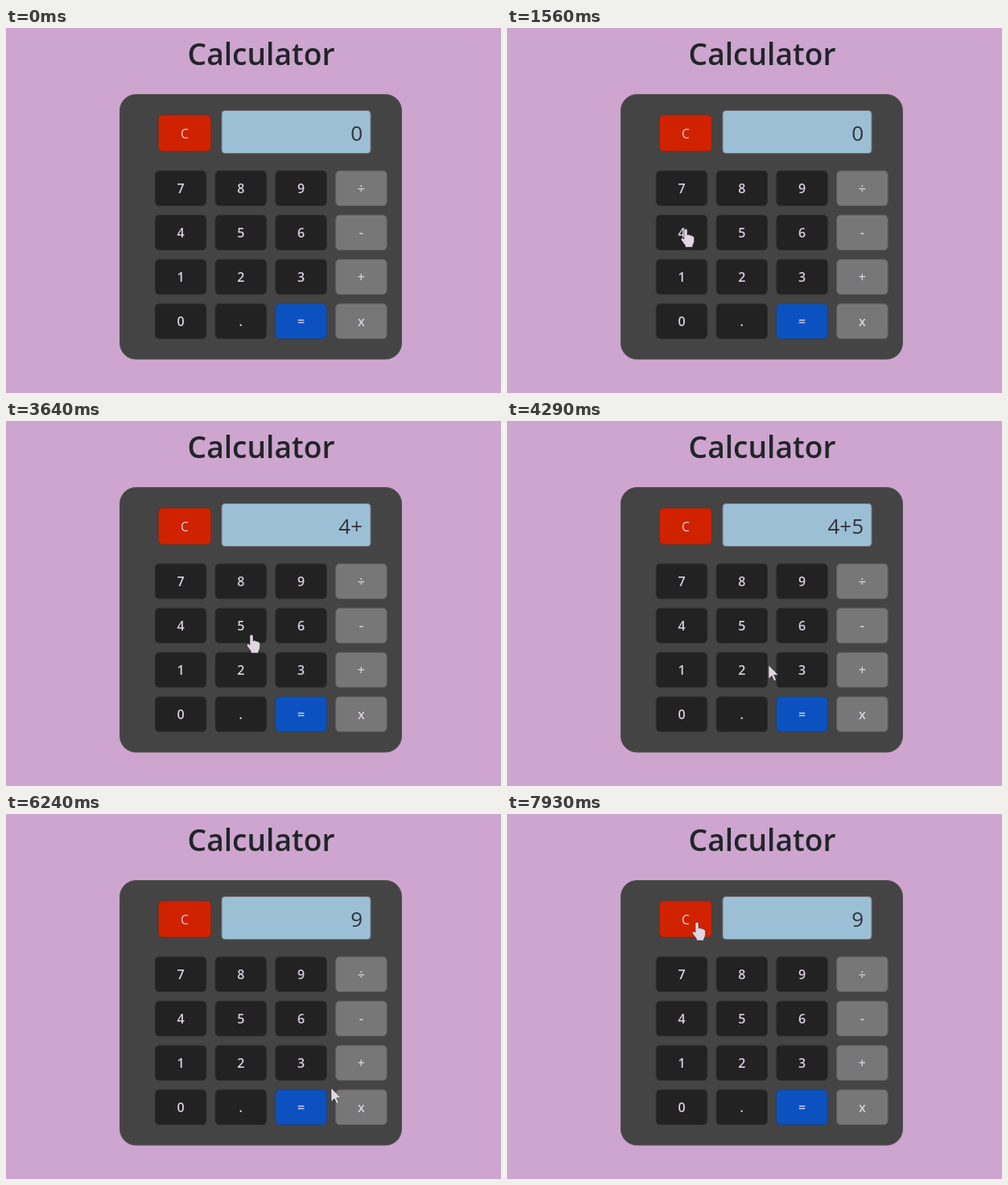
These frames come from a looping animation (615 by 453 pixels, 8 s). An HTML page with a canvas:

```html
<!DOCTYPE html>
<html lang="en">
<head>
<meta charset="utf-8">
<title>Calculator</title>
<style>
  html, body { margin: 0; width: 100%; height: 100%; overflow: hidden; background: #cda5cf; }
  canvas { display: block; }
</style>
</head>
<body>
<canvas id="stage" width="615" height="453"></canvas>
<script>
const ctx = document.getElementById('stage').getContext('2d');
const LOOP = 8000, STEP = 130;
const SANS = '"Open Sans", "Noto Sans", sans-serif';
const KEY = { fill: '#222222', edge: '#2e2e2e' };
const OPERATOR = { fill: '#777777', edge: '#626262' };
const EQUALS = { fill: '#0b52c0', edge: '#20437a' };
const CLEAR = { fill: '#d12200', edge: '#7d2a1c' };

const buttons = [{ label: 'C', x: 189, y: 107.5, w: 66, h: 46, style: CLEAR }];
['789÷', '456-', '123+', '0.=x'].forEach((row, r) => [...row].forEach((label, c) => {
  const style = label === '=' ? EQUALS : c === 3 ? OPERATOR : KEY;
  buttons.push({ label, x: 184.8 + c * 74.8, y: 176.7 + r * 55, w: 64.4, h: 44.4, style });
}));

// The pointer glides to each place, then a press may change the display.
const entry = { x: 487, y: 205 };
const visits = [
  { leave: 390, arrive: 1690, x: 219, y: 249, press: 2210, shows: '4' },
  { leave: 2340, arrive: 3120, x: 441, y: 308, press: 3120, shows: '4+' },
  { leave: 3250, arrive: 3900, x: 279, y: 257, press: 4160, shows: '4+5' },
  { leave: 4030, arrive: 5200, x: 396, y: 373, press: 5460, shows: '9' },
  { leave: 6110, arrive: 7020, x: 427, y: 249 },
  { leave: 7020, arrive: 7930, x: 236, y: 134 }
];

const easeOut = k => 1 - (1 - k) ** 2;
const mix = (a, b, k) => a + (b - a) * k;

function pointerAt(time) {
  const index = visits.findLastIndex(visit => time >= visit.leave);
  if (index < 0) return null;
  const to = visits[index], from = visits[index - 1] || entry;
  const k = easeOut(Math.min(1, (time - to.leave) / (to.arrive - to.leave)));
  return { x: mix(from.x, to.x, k), y: mix(from.y, to.y, k) };
}

function readingAt(time) {
  const last = visits.findLast(visit => time >= visit.press);
  return last ? last.shows : '0';
}

function box(x, y, w, h, radius, { fill, edge }) {
  ctx.beginPath();
  ctx.roundRect(x + 0.5, y + 0.5, w - 1, h - 1, radius);
  ctx.fillStyle = fill;
  ctx.fill();
  ctx.strokeStyle = edge;
  ctx.lineWidth = 1;
  ctx.stroke();
}

function text(value, x, y, font, fill, align = 'center') {
  ctx.font = `${font} ${SANS}`;
  ctx.textAlign = align;
  ctx.fillStyle = fill;
  ctx.fillText(value, x, y);
}

const hand = new Path2D('M-2 1.5Q0-1 2 1.5V8Q4 6.5 5.5 8.5Q7.5 7.5 8.5 9.5Q10 9 10.5 11V16Q10 19 8.5 21V23H-.5V21L-5.5 14Q-6 11.5-4 11.5L-2 13Z');
const arrow = new Path2D('M0 0V17L4 13.2L6.8 19.5L9.4 18.4L6.6 12.3H12Z');

function drawPointer({ x, y }) {
  const hovering = buttons.some(b => x >= b.x && x <= b.x + b.w && y >= b.y && y <= b.y + b.h);
  const shape = hovering ? hand : arrow;
  ctx.save();
  ctx.translate(Math.round(x), Math.round(y));
  ctx.fillStyle = '#e2d6e2';
  ctx.fill(shape);
  ctx.strokeStyle = 'rgba(30, 30, 30, .65)';
  ctx.lineWidth = 0.7;
  ctx.stroke(shape);
  ctx.restore();
}

function draw(time) {
  ctx.fillStyle = '#cda5cf';
  ctx.fillRect(0, 0, 615, 453);
  text('Calculator', 317, 46, '600 37.2px', '#212529');

  box(141, 82, 351, 329.5, 20, { fill: '#444444', edge: '#535153' });
  box(267.5, 102, 186, 54, 4, { fill: '#9bc0d5', edge: '#77737a' });
  text(readingAt(time), 443, 140, '400 26px', '#34303a', 'right');

  for (const { label, x, y, w, h, style } of buttons) {
    box(x, y, w, h, 5, style);
    const font = label === 'C' ? '400 15.5px' : '600 16px';
    text(label, x + w / 2, y + h / 2 + 6, font, '#d9cedf');
  }

  const pointer = pointerAt(time);
  if (pointer) drawPointer(pointer);
}

function frame(now) {
  draw(Math.floor((now % LOOP) / STEP) * STEP);
  requestAnimationFrame(frame);
}
draw(0);
requestAnimationFrame(frame);
</script>
</body>
</html>
```
